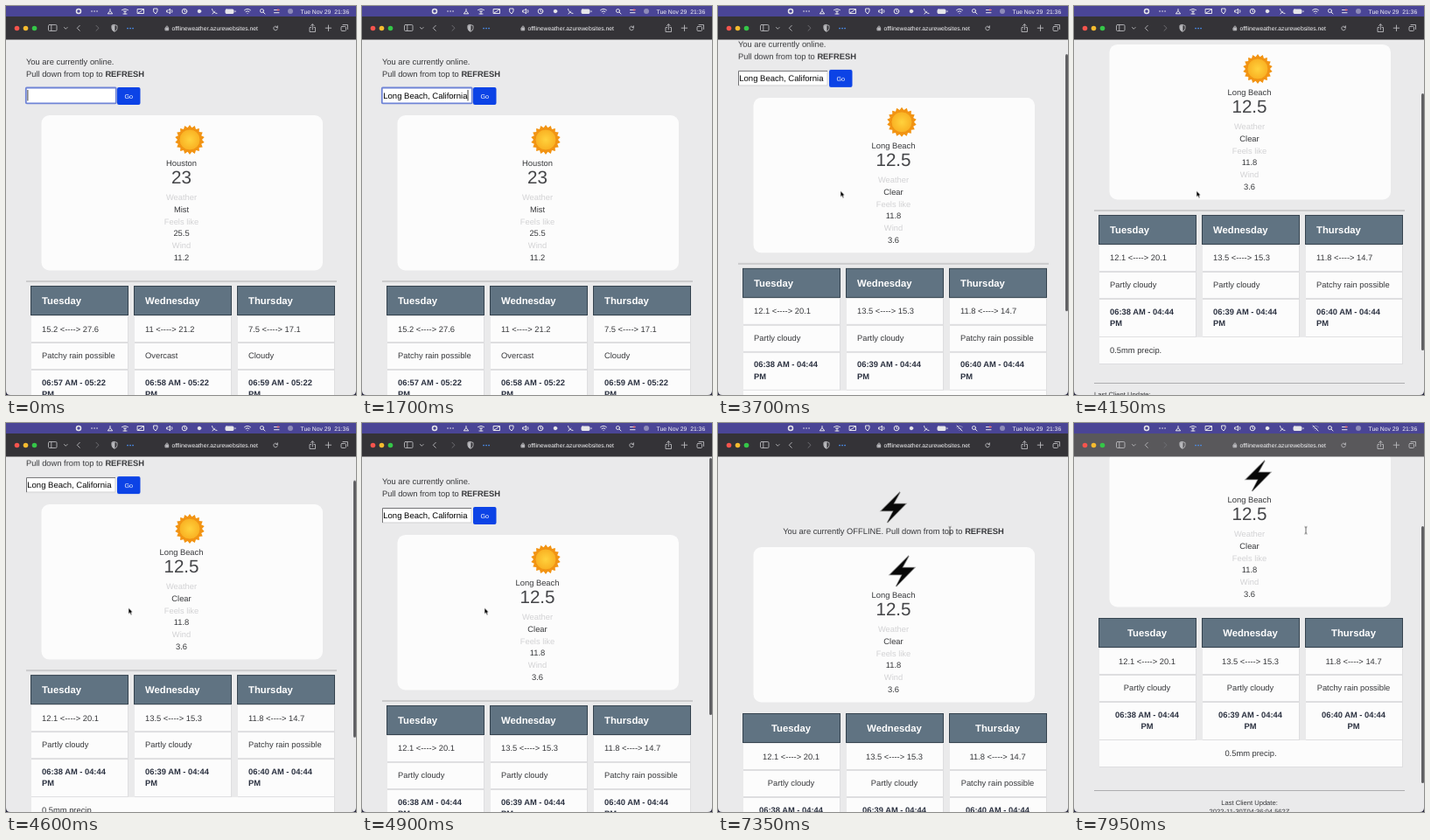
These frames come from a looping animation (400 by 445 pixels, 8 s). An HTML page:

```html
<!DOCTYPE html>
<html lang="en">
<head>
<meta charset="utf-8">
<title>Offline weather</title>
<style>
html, body { margin: 0; width: 100%; height: 100%; overflow: hidden; background: #29283f; }
svg { display: block; width: 100vw; height: 100vh; }
text { font: 9.35px "Liberation Sans", Arial, sans-serif; fill: #37383b; white-space: pre; text-rendering: geometricPrecision; }
.mid { text-anchor: middle; }
.bold { font-weight: bold; }
.time { font-weight: bold; fill: #2b3140; }
.temp { font-size: 20.6px; fill: #444548; }
.label { fill: #d2d2d4; }
.day { font-size: 11.3px; font-weight: bold; fill: #fff; }
.field { font-size: 9.5px; fill: #000; }
.small { font-size: 7.6px; }
.go { font-size: 7.2px; fill: #fff; }
.bar { font-size: 6.8px; fill: #f4f4f6; }
.line { fill: none; stroke: #e6e6ea; stroke-width: 1; stroke-linecap: round; stroke-linejoin: round; }
.tools { stroke: #b9b9bd; stroke-width: .9; }
.paper { fill: #fcfcfc; }

/* 1% of the loop is 80 ms */
.houston, .beach, .offline, .online, .focus, .blur, .wifi, .slash, .arrow, .pointer, .scroll, .thumb, .rail, .toolbar {
  animation: 8s step-end infinite;
}
.houston { animation-name: houston; }
.beach { animation-name: beach; }
.online { animation-name: online; }
.offline { animation-name: offline; }
.focus { animation-name: focus; }
.blur { animation-name: blur; }
.wifi { animation-name: wifi; }
.slash { animation-name: slash; }
.arrow { animation-name: arrow; }
.pointer { animation-name: pointer; animation-timing-function: ease-in-out; }
.scroll { animation-name: scroll; animation-timing-function: linear; }
.thumb { animation-name: thumb; animation-timing-function: linear; }
.rail { animation-name: rail; animation-timing-function: linear; }
.toolbar { animation-name: toolbar; animation-timing-function: linear; }

@keyframes houston { 0% { opacity: 1 } 33.75%, 100% { opacity: 0 } }
@keyframes beach { 0% { opacity: 0 } 33.75% { opacity: 1 } 88.75%, 100% { opacity: 0 } }
@keyframes online { 0% { opacity: 1 } 88.75%, 100% { opacity: 0 } }
@keyframes offline { 0% { opacity: 0 } 88.75%, 100% { opacity: 1 } }
@keyframes focus { 0% { opacity: 1 } 28.75%, 100% { opacity: 0 } }
@keyframes blur { 0% { opacity: 0 } 28.75%, 100% { opacity: 1 } }
@keyframes wifi { 0% { opacity: 1 } 78.1%, 100% { opacity: .4 } }
@keyframes slash { 0% { opacity: 0 } 78.1%, 100% { opacity: 1 } }
@keyframes arrow { 0% { opacity: 0 } 23.5% { opacity: 1 } 88.75%, 100% { opacity: 0 } }
@keyframes pointer {
  0%, 23.5% { transform: translate(160px, 135px) }
  27.5%, 34.5% { transform: translate(139px, 103px) }
  40%, 64.5% { transform: translate(140px, 211.5px) }
  71%, 80% { transform: translate(276px, 5px) }
  85.5%, 100% { transform: translate(265px, 122.5px) }
}
@keyframes scroll {
  0%, 43.75% { transform: translateY(0) }
  46.25% { transform: translateY(-20px) }
  51.875% { transform: translateY(-81px) }
  54% { transform: translateY(-84px) }
  60% { transform: translateY(5px) }
  61.25% { transform: translateY(3px) }
  63%, 85.6% { transform: translateY(0) }
  88.7% { transform: translateY(34px) }
  91%, 92.5% { transform: translateY(0) }
  99.375%, 100% { transform: translateY(-109px) }
}
@keyframes thumb {
  0%, 43.75% { transform: translateY(0) }
  46.25% { transform: translateY(15px) }
  51.875% { transform: translateY(60px) }
  54% { transform: translateY(62px) }
  60%, 92.5% { transform: translateY(0) }
  99.375%, 100% { transform: translateY(78px) }
}
@keyframes rail {
  0%, 43.7% { opacity: 0 }
  44.5%, 65% { opacity: 1 }
  68%, 92.5% { opacity: 0 }
  93.5%, 100% { opacity: 1 }
}
@keyframes toolbar {
  0%, 94% { fill: #343337 }
  98%, 100% { fill: #59585b }
}
</style>
</head>
<body>
<svg viewBox="0 0 400 445" preserveAspectRatio="none">
  <defs>
    <radialGradient id="glow"><stop offset="0" stop-color="#ffd23d"/><stop offset="1" stop-color="#f9b022"/></radialGradient>
    <clipPath id="window"><path d="M0 38H400V440Q400 445 395 445H5Q0 445 0 440Z"/></clipPath>
    <path id="bolt" d="M7.500-17.500L-14 4H0L-7 17.500 14-4H0Z" fill="#080808" stroke="#999" stroke-width="1.600" paint-order="stroke"/>
  </defs>

  <g clip-path="url(#window)">
    <rect y="38" width="400" height="407" fill="#eaeaeb"/>
    <g class="scroll" id="page"></g>
    <g class="rail"><rect class="thumb" x="397" y="40" width="3" height="294" rx="1.500" fill="#606063"/></g>
  </g>

  <rect width="400" height="12" fill="#4a4596"/>
  <g class="line" id="menu">
    <circle cx="83" cy="6" r="2.500" stroke-width="1.500"/>
    <path d="M98 6h.1M101 6h.1M104 6h.1" stroke-width="1.500"/>
    <path d="M119 3.500v2M116.500 8.500l2.500-3 2.500 3Z"/>
    <path d="M132.500 4.500q3.500-2.500 7 0M134.500 6h3M136 6v3M134 9h4"/>
    <path d="M150.500 3.500h7v5h-7ZM151 8l6-4"/>
    <path d="M169 3h4v3l-2 3-2-2Z"/>
    <path d="M184 5h1.500l2-2v6l-2-2H184ZM189.500 4.500q1.300 1.500 0 3"/>
    <circle cx="204" cy="6" r="2.800"/><path d="M204 4.500V6l1 .6"/>
    <circle cx="221" cy="6" r="1.800" fill="#e6e6ea"/>
    <path d="M235.500 3.500q1 4.500 5.500 5M236 9l2.500-3"/>
    <rect x="251" y="4" width="9" height="4.500" rx="1" fill="#e6e6ea"/><path d="M262 5.700v1"/>
    <path class="wifi" d="M272.500 4.800q3.500-3 7 0M274 6.500q2-1.700 4 0M276 8.500h.1"/>
    <path class="slash" d="M273 3l6 6"/>
    <circle cx="292.500" cy="5.500" r="2"/><path d="M294 7l2 2"/>
    <path d="M306.500 4.500h5.500M306.500 7.700h5.500"/><circle cx="311" cy="4.500" r=".8" stroke="#e86a72"/>
    <circle cx="325" cy="6" r="3" fill="#8e8bb8" stroke="none"/>
  </g>
  <text class="bar" x="336.500" y="8.700">Tue Nov 29  21:36</text>

  <rect class="toolbar" y="12" width="400" height="26.500" fill="#343337"/>
  <circle cx="12.500" cy="25.500" r="2.800" fill="#f6544d"/>
  <circle cx="22.500" cy="25.500" r="2.800" fill="#f5bb2f"/>
  <circle cx="32.500" cy="25.500" r="2.800" fill="#35c648"/>
  <g class="line tools">
    <rect x="48.500" y="21.500" width="9.500" height="7" rx="1.200"/><path d="M51.800 21.500v7"/>
    <path d="M66.500 24.500l1.800 1.800 1.800-1.800M84.300 22.300l-3 3 3 3"/>
    <path d="M103 22.300l3 3-3 3" stroke="#727276"/>
    <path d="M124 21.500l3 1v3q0 2.700-3 3.800-3-1.100-3-3.800v-3Z"/><path d="M124 22v7q-2.700-1.300-2.700-3.500v-2.600Z" fill="#b9b9bd"/>
    <path d="M139 25.500h.1M142 25.500h.1M145 25.500h.1" stroke="#4b91f2" stroke-width="1.700"/>
    <rect x="182.300" y="25" width="3.400" height="2.800" fill="#b9b9bd"/><path d="M182.900 25v-1.300q1.100-1.700 2.200 0V25"/>
    <path d="M310.200 24.500a2.300 2.300 0 1 0 .2 1.300M310.400 22.800v1.700h-1.700"/>
    <path d="M348.500 24.500h-1.500v5h6.500v-5H352M350.300 27v-6M348.500 22.500l1.800-1.800 1.800 1.800"/>
    <path d="M368.500 22v6.500M365.200 25.200h6.500"/>
    <rect x="383" y="23.500" width="5.500" height="5" rx="1"/><path d="M385 21.500h5.500v5"/>
  </g>
  <text class="bar" x="189.500" y="27.600">offlineweather.azurewebsites.net</text>

  <g class="pointer">
    <path class="arrow" d="M0 0V7L1.600 5.600 2.800 8.200 4 7.600 2.900 5.100H5Z" fill="#000" stroke="#fff" stroke-width=".6"/>
    <path class="offline" d="M-1.500-3.800Q0-3.800 0-2.800 0-3.800 1.500-3.800M0-3V3.500M-1.500 4.300Q0 4.300 0 3.300 0 4.300 1.500 4.300" fill="none" stroke="#333" stroke-width=".7"/>
  </g>
</svg>
<script>
const text = (x, y, s, cls = '') => `<text x="${x}" y="${y}" class="${cls}">${s}</text>`;
const paper = (x, y, w, h, r = 0) =>
  `<rect class="paper" x="${x}" y="${y}" width="${w}" height="${h}" rx="${r}"/>`;
const rule = y => `<rect x="23" y="${y}" width="355" height="1" fill="#adadaf"/>`;
const bolt = (x, y) => `<use href="#bolt" x="${x}" y="${y}"/>`;

function sun(x, y) {
  const points = Array.from({ length: 36 }, (_, i) => {
    const r = i % 2 ? 14 : 17, a = i * Math.PI / 18;
    return [x + r * Math.sin(a), y - r * Math.cos(a)].map(v => v.toFixed(1));
  }).join(' ');
  return `<polygon points="${points}" fill="#f29413"/>
    <circle cx="${x}" cy="${y}" r="12" fill="url(#glow)" stroke="#ee8d12" stroke-width=".8"/>`;
}

function card(top, icon, { city, temp, sky, feels, wind }) {
  const lines = [[58.2, city], [97, 'Weather', 'label'], [110.7, sky], [124.7, 'Feels like', 'label'],
    [138.3, feels], [152.3, 'Wind', 'label'], [166, wind]];
  return paper(40.5, top, 321.5, 177.5, 9) + icon +
    lines.map(([y, s, cls = '']) => text(200.5, top + y, s, 'mid ' + cls)).join('') +
    text(200.5, top + 78, temp, 'mid temp');
}

function table(top, days, centred) {
  const names = ['Tuesday', 'Wednesday', 'Thursday'];
  const mid = centred ? 'mid ' : '';
  const cells = days.map(([range, sky, hours], i) => {
    const left = 28 + 118 * i, x = left + (centred ? 55.5 : 13);
    return `<rect x="${left + .5}" y="${top + .5}" width="111" height="33" fill="#607382" stroke="#35434f"/>` +
      `<rect x="${left + 1}" y="${top + 35}" width="111" height="105" fill="#dedee0"/>` +
      paper(left + 1, top + 35, 110, 29) + paper(left + 1, top + 66, 110, 29) + paper(left + 1, top + 97, 110, 42) +
      text(x, top + 21.3, names[i], mid + 'day') +
      text(x, top + 52.5, range, mid) + text(x, top + 83.2, sky, mid) +
      text(x, top + 113.6, hours, mid + 'time') + text(x, top + 127.4, 'PM', mid + 'time');
  }).join('');
  return cells + `<rect x="29" y="${top + 140}" width="347" height="31" fill="#dedee0"/>` +
    paper(29, top + 140, 346, 30) +
    text(centred ? 202 : 41, top + 158, '0.5mm precip.', mid);
}

const houston = { city: 'Houston', temp: '23', sky: 'Mist', feels: '25.5', wind: '11.2' };
const beach = { city: 'Long Beach', temp: '12.5', sky: 'Clear', feels: '11.8', wind: '3.6' };
const houstonDays = [
  ['15.2 &lt;----&gt; 27.6', 'Patchy rain possible', '06:57 AM - 05:22'],
  ['11 &lt;----&gt; 21.2', 'Overcast', '06:58 AM - 05:22'],
  ['7.5 &lt;----&gt; 17.1', 'Cloudy', '06:59 AM - 05:22']];
const beachDays = [
  ['12.1 &lt;----&gt; 20.1', 'Partly cloudy', '06:38 AM - 04:44'],
  ['13.5 &lt;----&gt; 15.3', 'Partly cloudy', '06:39 AM - 04:44'],
  ['11.8 &lt;----&gt; 14.7', 'Patchy rain possible', '06:40 AM - 04:44']];
const refresh = '<tspan class="bold">REFRESH</tspan>';

document.getElementById('page').innerHTML = `
  <g class="online">
    ${text(23, 67, 'You are currently online.')}
    ${text(23, 81, 'Pull down from top to ' + refresh)}
    <rect x="23" y="94" width="102.5" height="17" fill="#fff"/>
    <rect class="focus" x="22.8" y="93.5" width="103" height="17.8" rx="1" fill="none" stroke="#6f84d6" stroke-width="1.8"/>
    <g class="blur" fill="none"><path d="M125 94V111H23" stroke="#cfcfd1"/><path d="M23.500 111V94.500H125" stroke="#717174"/></g>
    <text id="typed" class="field" x="24.3" y="105.800"></text>
    <rect id="caret" class="focus" y="96" width=".8" height="12.500" fill="#111"/>
    <rect x="127" y="93" width="26.500" height="20" rx="2" fill="#0c43e6"/>
    ${text(140.2, 105.7, 'Go', 'mid go')}
    ${rule(314.5)}${rule(512)}
    ${text(23, 528, 'Last Client Update:', 'small')}
  </g>
  <g class="houston">${card(125, sun(210, 153), houston)}${table(320, houstonDays)}</g>
  <g class="beach">${card(125, sun(210, 153), beach)}${table(320, beachDays)}</g>
  <g class="offline">
    ${bolt(200.5, 96.5)}
    ${text(200.5, 126.7, 'You are currently OFFLINE. Pull down from top to ' + refresh, 'mid')}
    ${card(142, bolt(210.5, 169.5), beach)}${table(332, beachDays, true)}
    ${rule(529)}
    ${text(200.5, 545.7, 'Last Client Update:', 'mid small')}
    ${text(200.5, 556.3, '2022-11-30T04:36:04.562Z', 'mid small')}
  </g>`;

const typed = document.getElementById('typed');
const caret = document.getElementById('caret');
const query = 'Long Beach, California';
const [clock] = document.querySelector('.scroll').getAnimations();

function frame() {
  const t = (clock.currentTime || 0) % 8000;
  const count = Math.max(0, Math.min(query.length, Math.floor((t - 150) / 65)));
  typed.textContent = query.slice(0, count);
  caret.setAttribute('x', 24.5 + (count ? typed.getComputedTextLength() : 0));
  requestAnimationFrame(frame);
}
frame();
</script>
</body>
</html>
```
